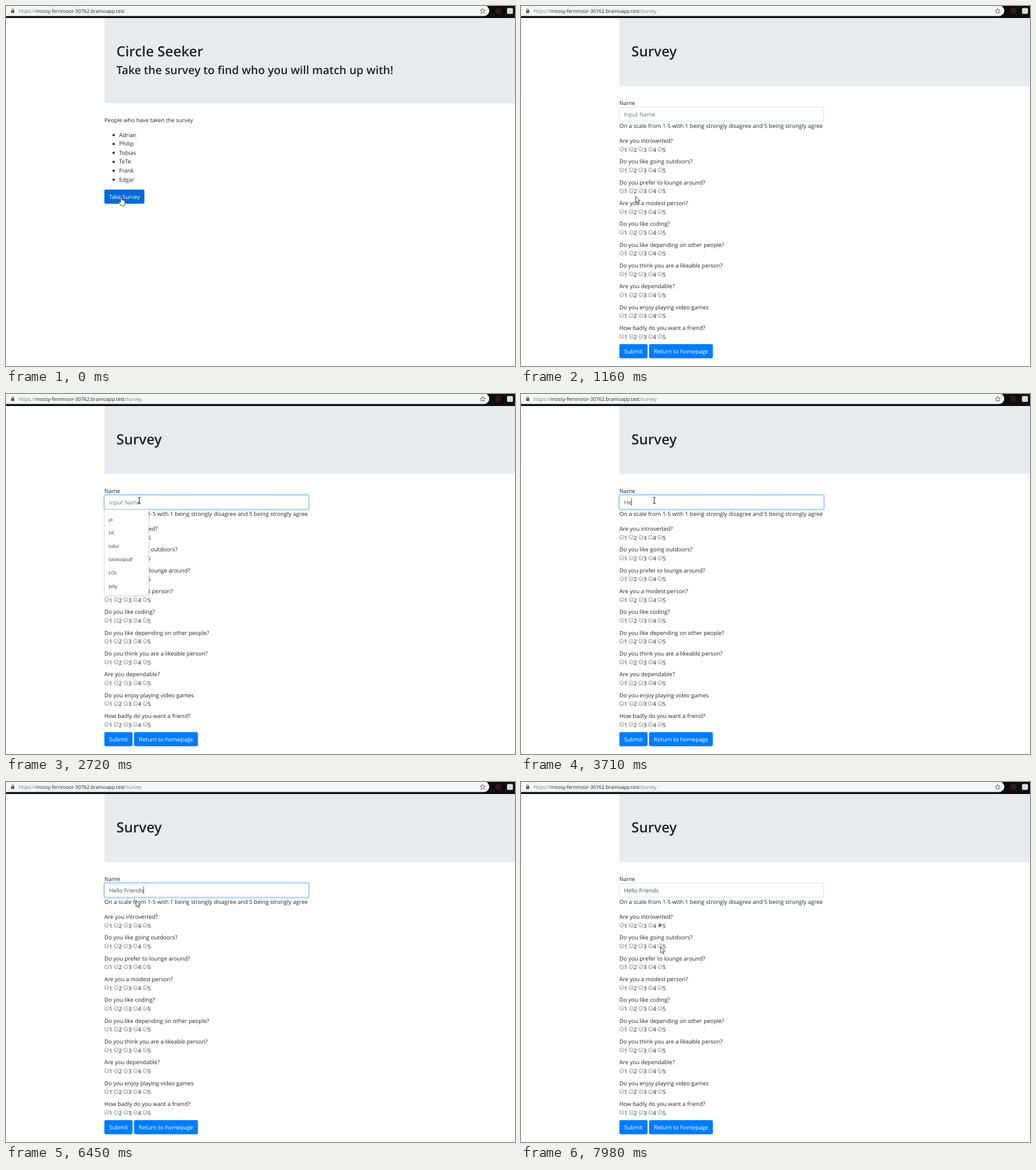
An HTML page for the animation above (8 s loop, 890 by 629 pixels).

```html
<!DOCTYPE html>
<html lang="en">
<head>
<meta charset="utf-8">
<title>Survey</title>
<style>
  html, body { margin: 0; width: 100%; height: 100%; overflow: hidden; background: #fff; }
  svg { display: block; width: 890px; height: 629px; }
  text {
    font: 9.9px "Open Sans", "Noto Sans", sans-serif;
    fill: #212529;
    text-rendering: geometricPrecision;
    white-space: pre;
  }
  .h1 { font-size: 24.5px; font-weight: 600; }
  .h2 { font-size: 19.62px; font-weight: 600; }
  .url { font-size: 8.65px; }
  .hint { font-size: 8.1px; fill: #333; }
  .dim { fill: #7a7d80; }
  .btn { fill: #fff; }
  .field { fill: #495057; }
  .holder { fill: #6c757d; }
</style>
</head>
<body>
<svg id="stage" viewBox="0 0 890 629">
  <defs>
    <linearGradient id="knob" x1="0" y1="0" x2="0" y2="1">
      <stop offset="0" stop-color="#f4f4f4"/>
      <stop offset="1" stop-color="#d8d8d8"/>
    </linearGradient>
  </defs>
</svg>
<script>
const LOOP = 8000;
const BAR = 21;
const stage = document.getElementById("stage");

function add(parent, tag, attrs = {}, content) {
  const el = document.createElementNS("http://www.w3.org/2000/svg", tag);
  for (const k in attrs) el.setAttribute(k, attrs[k]);
  if (content !== undefined) el.textContent = content;
  parent.append(el);
  return el;
}
const group = (parent = stage) => add(parent, "g");
const rect = (p, x, y, width, height, fill, rx = 0, more = {}) =>
  add(p, "rect", { x, y, width, height, fill, rx, ...more });
const label = (p, x, y, s, cls = "") => add(p, "text", { x, y, class: cls }, s);
const show = (el, on) => el.setAttribute("visibility", on ? "inherit" : "hidden");

// Latest entry of a [time, ...values] list
function at(list, t) {
  let hit = list[0];
  for (const row of list) if (row[0] <= t) hit = row;
  return hit;
}

function button(p, x, y, w, s, fill) {
  rect(p, x, y, w, 24.7, fill, 2.6);
  label(p, x + 8.3, y + 16.2, s, "btn");
}

function banner(p, bottom, title) {
  rect(p, 172, BAR, 730, bottom - BAR, "#e8ebee", 3.5);
  rect(p, 172, BAR, 730, 10, "#e8ebee");
  label(p, 193, 88, title, "h1");
}

// Browser bar
rect(stage, 0, 0, 890, BAR, "#0e0e0e");
rect(stage, -20, -1, 865, 18.4, "#f4f5f6", 9.2);
rect(stage, 9, 7.6, 5.6, 4.6, "#55585b", 0.6);
add(stage, "path", { d: "M10.2 8V6.4a1.6 1.6 0 0 1 3.2 0V8", fill: "none", stroke: "#55585b" });
const star = Array.from({ length: 10 }, (_, i) => {
  const a = i * Math.PI / 5, r = i % 2 ? 2.1 : 4.8;
  return [833.5 + r * Math.sin(a), 8.9 - r * Math.cos(a)].map(v => v.toFixed(2)).join();
});
add(stage, "polygon", { points: star.join(" "), fill: "none", stroke: "#55585b", "stroke-width": 0.9 });
rect(stage, 856, 4, 9.5, 9.5, "#30181b");
rect(stage, 876, 3.4, 10.4, 10.4, "#dcdddd", 2);

const url = label(stage, 22, 11.8, "", "url");
add(url, "tspan", { class: "dim" }, "https://");
add(url, "tspan", {}, "mossy-fernmoor-30762.bramoapp.test");
const route = add(url, "tspan", { class: "dim" }, "/survey");

// Home page
const home = group();
banner(home, 170, "Circle Seeker");
label(home, 193, 119, "Take the survey to find who you will match up with!", "h2");
label(home, 172, 202.6, "People who have taken the survey").style.fontSize = "9.75px";
["Adrian", "Philip", "Tobias", "TeTe", "Frank", "Edgar"].forEach((name, i) => {
  const y = 228.6 + i * 15.6;
  add(home, "circle", { cx: 188.2, cy: y - 3.2, r: 2, fill: "#212529" });
  label(home, 197.8, y, name);
});
const homeRing = rect(home, 169.9, 318.7, 74.2, 28.9, "#007bff", 4.2);
button(home, 172, 320.8, 70, "Take Survey", "#0069d9");

// Survey page
const survey = group();
banner(survey, 140, "Survey");
label(survey, 172, 172.8, "Name");
const ring = rect(survey, 169.9, 174.5, 361.6, 29, "#007bff", 4.4);
const box = rect(survey, 172.2, 176.8, 357, 24.4, "#fff", 2.6, { "stroke-width": 0.8 });
const holder = label(survey, 180.2, 192.8, "Input Name", "holder");
const field = label(survey, 180.2, 192.8, "", "field");
const caret = rect(survey, 180, 182.5, 0.9, 13, "#333");
label(survey, 172, 213, "On a scale from 1-5 with 1 being strongly disagree and 5 being strongly agree")
  .style.fontSize = "9.95px";

const questions = [
  "Are you introverted?", "Do you like going outdoors?", "Do you prefer to lounge around?",
  "Are you a modest person?", "Do you like coding?", "Do you like depending on other people?",
  "Do you think you are a likeable person?", "Are you dependable?",
  "Do you enjoy playing video games", "How badly do you want a friend?"
];
questions.forEach((q, row) => {
  const y = 239 + row * 36.35;
  label(survey, 172, y, q);
  for (let n = 0; n < 5; n++) {
    const x = 175.9 + n * 16.8;
    add(survey, "circle", { cx: x, cy: y + 11.2, r: 3.7, fill: "url(#knob)", stroke: "#999", "stroke-width": 0.8 });
    label(survey, x + 4.4, y + 15.6, n + 1);
  }
});
const dot = add(survey, "circle", { cx: 243.1, cy: 250.2, r: 2, fill: "#444" });
button(survey, 172, 590.7, 49.3, "Submit", "#007bff");
button(survey, 224, 590.7, 111.5, "Return to homepage", "#007bff");

// Suggestion list
const menu = group(survey);
rect(menu, 171.4, 202.6, 79.2, 151.4, "#000", 1.5, { opacity: 0.1 });
rect(menu, 171.9, 202, 77.8, 150.8, "#fff", 1, { stroke: "#c9c9c9", "stroke-width": 0.6 });
["ja", "lol", "lollol", "lololodasdf", "LOL", "Jelly"].forEach((s, i) =>
  label(menu, 179.6, 221.8 + i * 23.4, s, "hint"));

// Pointers
const shape = (d, more) => add(stage, "path", {
  d, fill: "#fff", stroke: "#111", "stroke-width": 0.8, "stroke-linejoin": "round", ...more
});
const pointers = {
  arrow: shape("M0 0V10.7L2.5 8.4L4.2 12.3L6 11.5L4.4 7.8H7.7Z"),
  hand: shape("M-1 1.2Q-1-.2 .2-.2T1.4 1.2V5Q2.5 4.4 3.2 5.3Q4.4 4.8 5 5.8Q6.6 5.4 6.7 7V10Q6.7 12 5.4 13.8V15H-.6V13.8L-3.9 9.4Q-4.6 8-3.2 7.6Q-2.2 7.4-1 9Z"),
  beam: shape("M-2.4-5.2H-.7L0-4.6L.7-5.2H2.4M0-4.6V4.6M-2.4 5.2H-.7L0 4.6L.7 5.2H2.4", { fill: "none", "stroke-width": 1 })
};

const moves = [
  [0, 201.4, 334, "hand"], [1080, 200.6, 332.8, "arrow"],
  [1620, 199.5, 328, "arrow"], [1700, 201, 307, "beam"], [1780, 208, 266, "arrow"],
  [1850, 219, 222, "arrow"], [1930, 229, 195, "beam"], [2010, 233, 186, "beam"],
  [6450, 227.3, 207.3, "arrow"], [6520, 225, 224, "arrow"], [6590, 225.8, 237, "arrow"], [6660, 227.6, 244, "arrow"],
  [7160, 231, 246, "arrow"], [7220, 237, 247, "arrow"], [7290, 240.5, 247, "arrow"],
  [7830, 241, 254, "arrow"], [7910, 243, 275, "arrow"], [7980, 244, 288, "arrow"]
];
const keys = [3480, 3710, 3790, 3940, 4130, 4260, 4490, 4570, 4650, 4800, 4880, 4950, 5030];
const phrase = "Hello Friends";
const blink = [
  [0, 0], [2190, 1], [2720, 0], [3250, 1], [5580, 0], [6040, 1], [6590, 0], [7160, 1], [7610, 0]
];
const homeGlow = [[0, 0], [860, 0.25], [940, 0.5]];
const glow = [[0, 0], [2190, 0.4], [2250, 1], [7610, 0.6], [7680, 0.2], [7750, 0]];

function draw(t) {
  const onSurvey = t >= 1160;
  show(home, !onSurvey);
  show(survey, onSurvey);
  show(route, t >= 1010);
  homeRing.setAttribute("opacity", at(homeGlow, t)[1]);

  const g = at(glow, t)[1];
  ring.setAttribute("opacity", g * 0.25);
  box.setAttribute("stroke", g > 0.3 ? "#80bdff" : "#ced4da");
  const typed = phrase.slice(0, keys.filter(k => k <= t).length);
  if (field.textContent !== typed) field.textContent = typed;
  show(holder, onSurvey && !typed);
  show(caret, onSurvey && at(blink, t)[1]);
  caret.setAttribute("x", 180 + (typed ? field.getComputedTextLength() : 0));
  show(menu, t >= 2320 && t < 3480);
  show(dot, t >= 7680);

  const [, x, y, kind] = at(moves, t);
  for (const k in pointers) show(pointers[k], k === kind);
  pointers[kind].setAttribute("transform", `translate(${x} ${y})`);
}

const start = performance.now();
function tick() {
  draw((performance.now() - start) % LOOP);
  requestAnimationFrame(tick);
}
tick();
</script>
</body>
</html>
```
